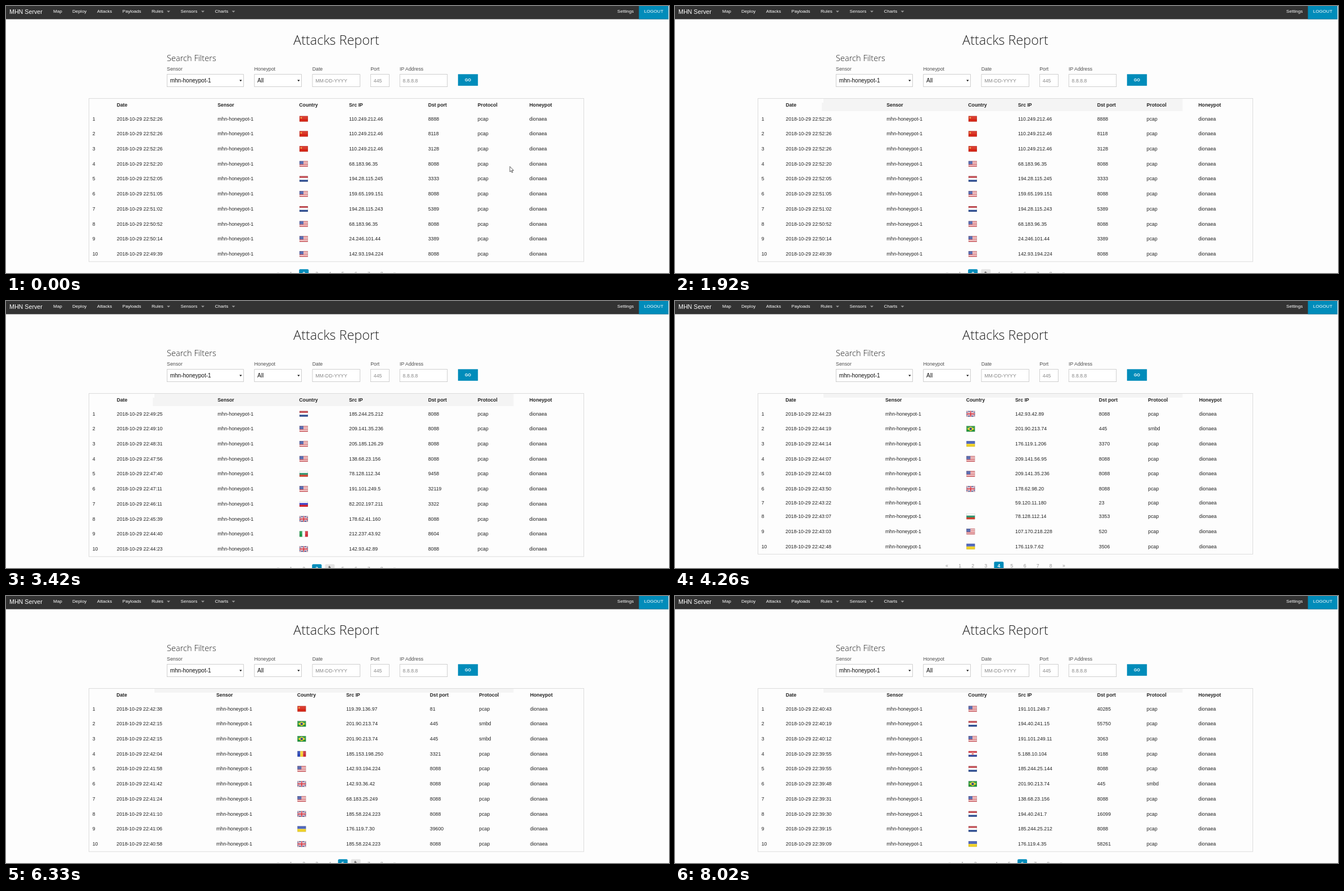
Write an HTML page that moves like this. It is 1179x475 px and loops after 8.65 s.

```html
<!DOCTYPE html>
<html lang="en">
<head>
<meta charset="utf-8">
<title>Attacks Report</title>
<style>
  html, body { margin: 0; width: 100%; height: 100%; overflow: hidden; background: #fdfdfd; }
  svg { display: block; width: 100%; height: 100%; font: 8.78px "Liberation Sans", Arial, sans-serif; fill: #222; }
  .light { font-family: "Open Sans", sans-serif; font-weight: 300; }
</style>
</head>
<body>
<svg viewBox="0 0 1179 475"><g id="chrome"></g><g id="view"></g></svg>
<script>
const LOOP = 8650;
const BLUE = '#008cba';

// Each row: time, flag, source address, port, protocol (pcap when left out)
const pages = {
  2: `22:52:26 cn 110.249.212.46 8888
22:52:26 cn 110.249.212.46 8118
22:52:26 cn 110.249.212.46 3128
22:52:20 us 68.183.96.35 8088
22:52:05 nl 194.28.115.245 3333
22:51:05 us 159.65.199.151 8088
22:51:02 nl 194.28.115.243 5389
22:50:52 us 68.183.96.35 8088
22:50:14 us 24.246.101.44 3389
22:49:39 us 142.93.194.224 8088`,
  3: `22:49:25 nl 185.244.25.212 8088
22:49:10 us 209.141.35.236 8088
22:48:31 us 205.185.126.29 8088
22:47:56 us 138.68.23.156 8088
22:47:40 bg 78.128.112.34 9458
22:47:11 us 191.101.249.5 32119
22:46:11 ru 82.202.197.211 3322
22:45:39 gb 178.62.41.160 8088
22:44:40 it 212.237.43.92 8604
22:44:23 gb 142.93.42.89 8088`,
  4: `22:44:23 gb 142.93.42.89 8088
22:44:19 br 201.90.213.74 445 smbd
22:44:14 ua 176.119.1.206 3370
22:44:07 us 209.141.56.95 8088
22:44:03 us 209.141.35.236 8088
22:43:50 gb 178.62.98.20 8088
22:43:22 tw 59.120.11.180 23
22:43:07 bg 78.128.112.14 3353
22:43:03 us 107.170.218.228 520
22:42:48 ua 176.119.7.62 3506`,
  5: `22:42:38 cn 119.39.136.97 81
22:42:15 br 201.90.213.74 445 smbd
22:42:15 br 201.90.213.74 445 smbd
22:42:04 md 185.153.198.250 3321
22:41:58 us 142.93.194.224 8088
22:41:42 gb 142.93.36.42 8088
22:41:24 us 68.183.25.249 8088
22:41:10 gb 185.58.224.223 8088
22:41:06 ua 176.119.7.30 39600
22:40:58 gb 185.58.224.223 8088`,
  6: `22:40:43 us 191.101.249.7 40285
22:40:19 nl 194.40.241.15 55750
22:40:12 us 191.101.249.11 3063
22:39:55 hr 5.188.10.104 9188
22:39:55 nl 185.244.25.144 8088
22:39:48 br 201.90.213.74 445 smbd
22:39:31 us 138.68.23.156 8088
22:39:30 nl 194.40.241.7 16099
22:39:15 nl 185.244.25.212 8088
22:39:09 ua 176.119.4.35 58261`
};
const headings = ['Date', 'Sensor', 'Country', 'Src IP', 'Dst port', 'Protocol', 'Honeypot'];
const wideColumns = [197, 376.3, 521.3, 610, 750.7, 838.8, 930.8];
const smbColumns = [196.5, 374, 517.7, 605, 753.8, 841.3, 932];

const pageTimes = [[0, 2], [2330, 3], [4260, 4], [5680, 5], [7200, 6]];

// time, shape, x, y, hovered page
const pointerTimes = [
  [0, 'arrow', 895.5, 285], [120, 'arrow', 830, 318], [240, 'arrow', 758, 352],
  [390, 'arrow', 735, 360], [520, 'arrow', 711, 366], [670, 'arrow', 472, 385],
  [820, 'arrow', 471, 412], [940, 'arrow', 472, 437], [1090, 'arrow', 500, 450],
  [1210, 'arrow', 532, 462], [1330, 'arrow', 559, 468], [1480, 'hand', 549, 471, 3],
  [1760, 'hand', 549, 472, 3], [2060, 'hand', 550, 472, 3], [2330, 'hand', 550, 473],
  [2450, 'none'], [3290, 'hand', 572, 470, 4], [3420, 'hand', 572, 471, 4],
  [4260, 'none'], [4520, 'arrow', 577, 469], [4670, 'hand', 594, 470, 5],
  [4950, 'hand', 594.5, 469, 5], [5680, 'hand', 595, 470], [6090, 'arrow', 606, 469],
  [6210, 'hand', 617, 470, 6], [6330, 'hand', 618, 471, 6], [7200, 'none'],
  [7760, 'arrow', 625, 466], [7880, 'arrow', 898, 465], [8020, 'none']
];

const latest = (list, t) => list.findLast(entry => entry[0] <= t);

const rect = (x, y, w, h, fill, extra = '') =>
  `<rect x="${x}" y="${y}" width="${w}" height="${h}" fill="${fill}" ${extra}/>`;
const path = (d, fill, extra = '') => `<path d="${d}" fill="${fill}" ${extra}/>`;
const text = (x, y, s, extra = '') => `<text x="${x}" y="${y}" ${extra}>${s}</text>`;
const frame = (x, y, w, h, stroke) => rect(x, y, w, h, '#fff', `stroke="${stroke}" stroke-width=".8"`);
const line = (d, color, width) => path(d, 'none', `stroke="${color}" stroke-width="${width}"`);

const bands = (...colors) =>
  colors.map((c, i) => rect(0, i * 10 / colors.length, 15, 10 / colors.length, c)).join('');
const pales = (...colors) => colors.map((c, i) => rect(i * 5, 0, 5, 10, c)).join('');

const flags = {
  cn: rect(0, 0, 15, 10, '#d62718') + path('M3 1.3l.5 1.3h1.3l-1 .9.4 1.3-1.2-.8-1.2.8.4-1.3-1-.9h1.3z', '#f6c63c'),
  us: bands('#d0444b', '#f7eeee', '#d0444b', '#f7eeee', '#d0444b', '#f7eeee', '#d0444b') + rect(0, 0, 7, 5.7, '#4a5fa8'),
  nl: bands('#bd3b42', '#fff', '#2f4f93'),
  bg: bands('#fafafa', '#299067', '#d0402c'),
  ru: bands('#fafafa', '#2b30c4', '#d61f27'),
  it: pales('#219a4c', '#fafafa', '#d4313d'),
  md: pales('#2a46b5', '#f8d12f', '#cb2b34'),
  ua: bands('#3e58b5', '#f0d228'),
  hr: bands('#d5323c', '#fff', '#31469b') + rect(5.7, 2.2, 3.6, 4.8, '#d98a8a'),
  tw: rect(0, 0, 15, 10, '#e0202b') + rect(0, 0, 7.5, 5, '#22328f') + '<circle cx="3.75" cy="2.5" r="1.4" fill="#fff"/>',
  br: rect(0, 0, 15, 10, '#24953b') + path('M7.5 1L14 5 7.5 9 1 5z', '#f2d529') + '<circle cx="7.5" cy="5" r="2.2" fill="#2b4287"/>',
  gb: rect(0, 0, 15, 10, '#34488f') + line('M0 0L15 10M15 0L0 10', '#fff', 2) + line('M0 0L15 10M15 0L0 10', '#d0414d', .8) +
      line('M7.5 0V10M0 5H15', '#fff', 3.4) + line('M7.5 0V10M0 5H15', '#d0303d', 1.9)
};
const flag = (code, x, y) => `<g transform="translate(${x} ${y})">${flags[code]}` +
  rect(0, 0, 15, 5, '#fff', 'opacity=".1"') +
  rect(.25, .25, 14.5, 9.5, 'none', 'stroke="#000" stroke-opacity=".2" stroke-width=".5"') + '</g>';

const pointers = {
  arrow: path('M.5 .5V10l2.2-2 1.5 3.4 1.5-.7-1.5-3.2h3z', '#fff', 'stroke="#333" stroke-width=".8"'),
  hand: path('M2.2 6V1.2q.8-1 1.6 0V4l3.6.9q.9.3.8 1.3L7.6 10.5H3.2L.6 7q.4-1.2 1.6-.2', '#fff', 'stroke="#222" stroke-width=".8"'),
  none: ''
};

function drawChrome() {
  const nav = [['Map', 84], ['Deploy', 118], ['Attacks', 162], ['Payloads', 207], ['Rules', 259, 286],
    ['Sensors', 310.5, 347], ['Charts', 371.5, 401.5], ['Settings', 1087]];
  const white = 'fill="#fff" font-size="8.1"';
  let out = rect(0, 0, 1178, 23.5, '#333') + rect(1125.5, 0, 52.5, 23.5, BLUE) +
    text(6, 13.6, 'MHN Server', 'fill="#fff" font-size="10.7"') + text(1134.7, 12.4, 'LOGOUT', white);
  for (const [label, x, caret] of nav) {
    out += text(x, 12.4, label, white);
    if (caret) out += path(`M${caret} 8.5h6l-3 3z`, '#999');
  }
  out += text(587.5, 69.3, 'Attacks Report', 'class="light" font-size="23.4" text-anchor="middle"') +
    text(286, 97.8, 'Search Filters', 'class="light" font-size="14.6"');

  const fields = [['Sensor', 286.4, 136.2, 'mhn-honeypot-1', true], ['Honeypot', 441.8, 83.8, 'All', true],
    ['Date', 545, 84.6, 'MM-DD-YYYY'], ['Port', 648.5, 33, '445'], ['IP Address', 700.3, 84.5, '8.8.8.8']];
  for (const [label, x, w, value, isSelect] of fields) {
    out += text(x - .3, 115, label, 'fill="#4d4d4d"') + frame(x, 121.6, w, 22, '#c4c4c4');
    out += isSelect
      ? text(x + 5.3, 135.8, value, 'font-size="10.03" fill="#111"') + path(`M${x + w - 7.5} 131.6h4.4l-2.2 2.6z`, '#111')
      : text(x + 5.3, 136.2, value, 'fill="#888"');
  }
  return out + rect(803.8, 121.3, 35.4, 20.6, BLUE) +
    text(821.4, 133.9, 'GO', 'fill="#fff" font-size="7" font-weight="bold" text-anchor="middle"');
}

function drawHeaderShade(t) {
  if (t < 120) return '';
  if (t >= 4260) return rect(264, 165, 638.5, 7, '#f4f4f4');
  const left = t < 670 ? 264 : 261;
  return rect(264, 165, 638.5, 7, '#f4f4f4') + rect(left, 172, 902.5 - left, 15, '#f4f4f4');
}

function drawTable(page, flagMissing, t) {
  const columns = page === 4 || page === 5 ? smbColumns : wideColumns;
  const lost = flagMissing ? 4.4 : 0;
  let out = rect(147.5, 164.5, 880, 290.3 - lost, '#fdfdfd', 'stroke="#d9d9d9" stroke-width=".9"') + drawHeaderShade(t);
  headings.forEach((h, i) => out += text(columns[i], 178.5, h, 'font-weight="bold" font-size="8.7"'));
  pages[page].split('\n').forEach((row, i) => {
    const [time, code, ip, port, protocol = 'pcap'] = row.split(' ');
    const shift = i < 6 ? 0 : i === 6 ? lost / 2 : lost;
    const y = 200.4 + 26.72 * i - shift;
    const cells = ['2018-10-29 ' + time, 'mhn-honeypot-1', '', ip, port, protocol, 'dionaea'];
    out += text(153.7, y + 3.1, i + 1);
    cells.forEach((cell, c) => { if (cell) out += text(columns[c], y + 3.1, cell); });
    if (!(flagMissing && code === 'tw')) out += flag(code, columns[2] + .6, y - 4.7);
  });
  return out;
}

function drawPager(page, hovered, lift) {
  const labels = ['«', 1, 2, 3, 4, 5, 6, 7, 8, '»'];
  return labels.map((label, i) => {
    let x = 483.5 + 23.1 * i;
    if (page === 6) {
      x += i < 4 ? 4.5 : -4.5;
      if (i === 3) { x = 552.8; label = '…'; }
    }
    const active = label === page;
    const fill = active ? BLUE : label === hovered ? '#e4e4e4' : '';
    return (fill && rect(x - 8.5, 468.2 - lift, 17, 20, fill, 'rx="2"')) +
      text(x, 478.7 - lift, label, `text-anchor="middle" fill="${active ? '#fff' : '#999'}"` + (active ? ' font-weight="bold"' : ''));
  }).join('');
}

function drawView(t) {
  const page = latest(pageTimes, t)[1];
  const [, shape, x = 0, y = 0, hovered] = latest(pointerTimes, t);
  const flagMissing = t >= 4260 && t < 4400;
  return drawTable(page, flagMissing, t) + drawPager(page, hovered, flagMissing ? 4.4 : 0) +
    `<g transform="translate(${x} ${y})">${pointers[shape]}</g>`;
}

const chrome = document.getElementById('chrome');
const view = document.getElementById('view');
chrome.innerHTML = drawChrome();
const start = performance.now();
let shown = '';
function tick() {
  const markup = drawView((performance.now() - start) % LOOP);
  if (markup !== shown) view.innerHTML = shown = markup;
  requestAnimationFrame(tick);
}
tick();
</script>
</body>
</html>
```
